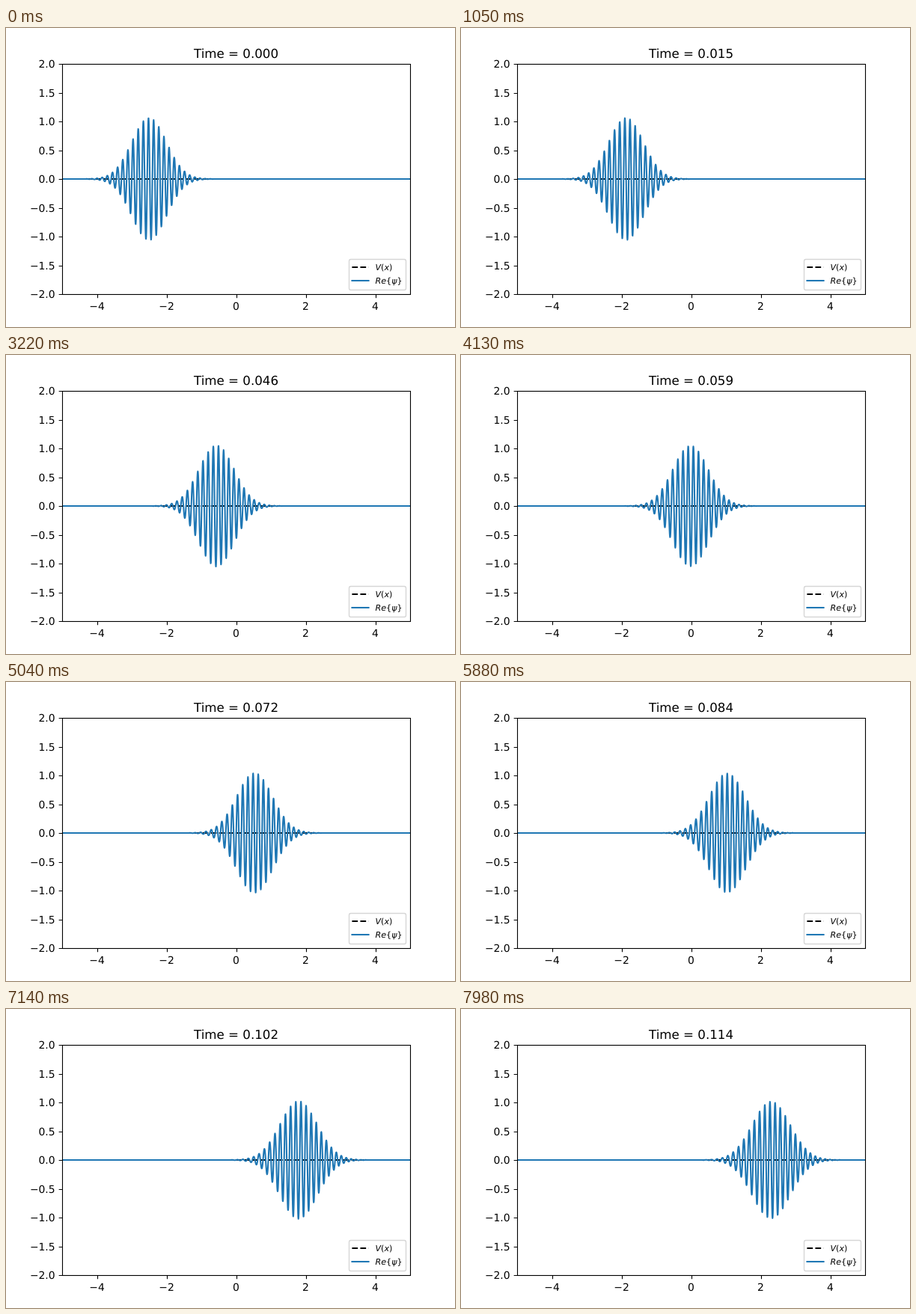
Write an HTML page that moves like this. It is 600 px wide and 400 px high and loops after 8000 ms.

```html
<!DOCTYPE html>
<html lang="en">
<head>
<meta charset="utf-8">
<title>Free wave packet</title>
<style>
  html, body { margin: 0; width: 100%; height: 100%; overflow: hidden; background: #fff; }
  svg { display: block; width: 600px; height: 400px; }
  text { font: 13.89px "DejaVu Sans", sans-serif; text-rendering: geometricPrecision; white-space: pre; }
  .title { font-size: 16.67px; }
  .legend text { font-size: 11.11px; }
  .italic { font-style: italic; }
  .line { fill: none; stroke-width: 2.083; stroke-linejoin: round; }
  .wave { stroke: #1f77b4; }
  .potential { stroke: #000; stroke-dasharray: 7.71 3.33; }
  .axis { fill: none; stroke: #000; stroke-width: 1.11; }
</style>
</head>
<body>
<svg viewBox="0 0 600 400">
  <clipPath id="plot"><rect x="75" y="48" width="465" height="308"/></clipPath>
  <g clip-path="url(#plot)">
    <path class="line potential" d="M75 202H540"/>
    <path class="line wave" id="wave"/>
  </g>
  <path class="axis" id="ticks"/>
  <rect class="axis" x="75.5" y="48.5" width="465" height="308"/>
  <g id="labels"></g>
  <text class="title" id="title" x="307.5" y="40" text-anchor="middle"></text>
  <g class="legend">
    <rect x="458.5" y="309.5" width="76" height="41" rx="2.2" fill="#fff" fill-opacity=".8"
          stroke="#ccc" stroke-opacity=".8" stroke-width="1.39"/>
    <path class="line potential" d="M462.4 320h22.2"/>
    <path class="line wave" d="M461.4 338h24.2"/>
    <text x="493.5" y="324"><tspan class="italic">V</tspan>(<tspan class="italic">x</tspan>)</text>
    <text x="493.5" y="342"><tspan class="italic">Re</tspan>{<tspan class="italic">ψ</tspan>}</text>
  </g>
</svg>
<script>
const LOOP = 8000, STEP = 70, DT = 0.001;
const byId = id => document.getElementById(id);
const toX = x => 307.5 + 46.5 * x;
const toY = y => 202 - 77 * y;

function addLabel(value, x, y, anchor) {
  const label = document.createElementNS("http://www.w3.org/2000/svg", "text");
  label.setAttribute("x", x);
  label.setAttribute("y", y);
  label.setAttribute("text-anchor", anchor);
  label.textContent = value.replace("-", "\u2212");
  byId("labels").append(label);
}

function drawAxes() {
  const snap = v => Math.floor(v + 0.5) + 0.5;
  let ticks = "";
  for (let x = -4; x <= 4; x += 2) {
    ticks += `M${snap(toX(x))} 356.5v4.86`;
    addLabel(String(x), toX(x), 377, "middle");
  }
  for (let y = -2; y <= 2; y += 0.5) {
    ticks += `M75.5 ${snap(toY(y))}h-4.86`;
    addLabel(y.toFixed(1), 65.6, Math.floor(toY(y) + 5.5), "end");
  }
  byId("ticks").setAttribute("d", ticks);
}

// Gaussian packet on a grid of spacing DX, with the grid's own dispersion.
const DX = 0.005, SIGMA = 0.5, X0 = -2.5, K = Math.sqrt(1800);
const OMEGA = (1 - Math.cos(K * DX)) / DX ** 2;
const SPEED = Math.sin(K * DX) / DX;
const SPREAD = Math.cos(K * DX) / SIGMA ** 2;

function wavePath(t) {
  const tau = SPREAD * t, widen = 1 + tau * tau;
  const amplitude = (Math.PI * SIGMA ** 2 * widen) ** -0.25;
  const points = [];
  for (let i = 0; i <= 2000; i++) {
    const x = -5 + i * DX;
    const q = (x - X0 - SPEED * t) ** 2 / (2 * SIGMA ** 2 * widen);
    const phase = K * x - OMEGA * t + q * tau - Math.atan(tau) / 2;
    const psi = amplitude * Math.exp(-q) * Math.cos(phase);
    points.push(toX(x).toFixed(2) + " " + toY(psi).toFixed(2));
  }
  return "M" + points.join("L");
}

let shown = -1;
function render(now) {
  const step = Math.floor((now % LOOP) / STEP);
  if (step !== shown) {
    shown = step;
    byId("wave").setAttribute("d", wavePath(step * DT));
    byId("title").textContent = "Time = " + (step * DT).toFixed(3);
  }
}

drawAxes();
render(0);
const start = performance.now();
requestAnimationFrame(function tick() {
  render(performance.now() - start);
  requestAnimationFrame(tick);
});
</script>
</body>
</html>
```
